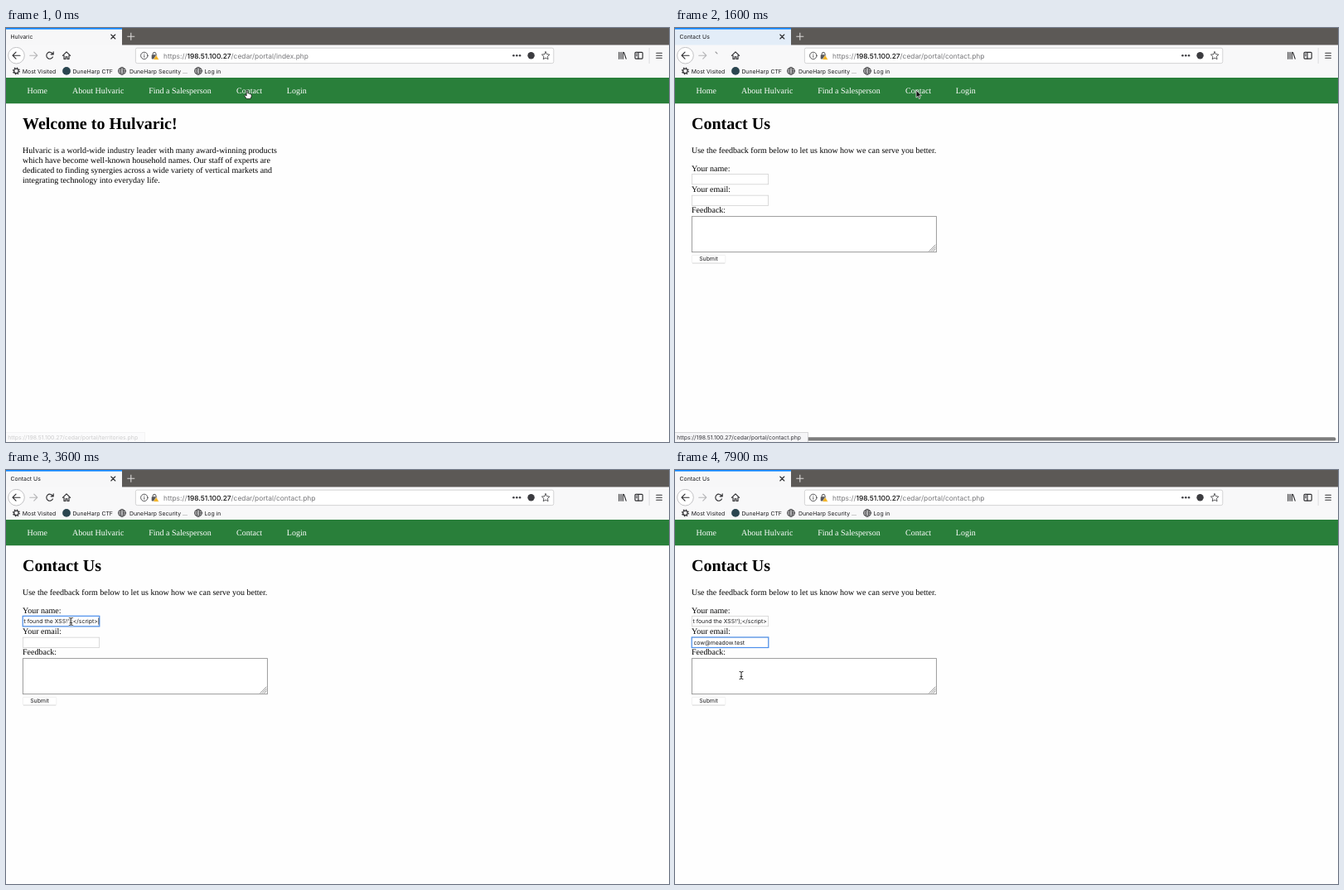
These frames come from a looping animation (800x500 px, 8 s). An HTML page:

```html
<!DOCTYPE html>
<html lang="en">
<head>
<meta charset="utf-8">
<title>Contact form</title>
<style>
html, body { margin: 0; width: 100%; height: 100%; overflow: hidden; background: #fefefe; }
svg { display: block; width: 100%; height: 100%; text-rendering: geometricPrecision; }
.ui { font-family: Inter, Roboto, sans-serif; font-size: 6.9px; fill: #1a1a1c; }
.url { font-size: 8.4px; fill: #77777a; }
.url .host { fill: #0c0c0d; font-weight: 500; }
.page { font-family: "Liberation Serif", "Noto Serif", serif; font-size: 10px; fill: #000; }
.page .h { font-size: 20px; font-weight: bold; }
.nav { fill: #fff; }
.line { fill: none; stroke: #2f2f32; stroke-width: 1.15; stroke-linecap: round; stroke-linejoin: round; }
.thin { stroke-width: .8; }
.field { fill: #fff; stroke: #d2d2d2; stroke-width: .8; }
.ring { fill: none; stroke: #4d90ec; stroke-width: 1.2; }
.status rect { fill: #f5f5f7; stroke: #c6c6c8; stroke-width: .7; }
.status text { fill: #38383d; }

/* one loop is 8 s, so 1.25% is 100 ms */
.before, .after, .titles, .name-ring, .name-text, .mail-ring, .typed, .filled,
.list, .caret, .load, .read, .hand, .arrow, .beam { animation: 8s step-end infinite; }
.moving, .moved, .bar, .over, .stop1, .stop2, .reload, .tint { animation: 8s linear infinite; }

.before { animation-name: before; }
.after { animation-name: after; }
.titles { animation-name: titles; }
.load { animation-name: load; }
.read { animation-name: read; }
.over { animation-name: over; }
.faint { animation: faint 8s step-end infinite; }
.stop1 { animation-name: stop1; stroke-dasharray: 1 2; }
.stop2 { animation-name: stop2; }
.reload { animation-name: reload; }
.tint { animation-name: tint; }
.bar { animation-name: bar; }
.name-ring { animation-name: nameRing; }
.name-text { animation-name: nameText; }
.mail-ring { animation-name: mailRing; }
.typed { animation-name: typed; }
.list { animation-name: list; }
.filled { animation-name: filled; }
.caret { animation-name: caret; }
.hand { animation-name: hand; }
.arrow { animation-name: arrow; }
.beam { animation-name: beam; }
.moving { animation-name: move; animation-timing-function: ease-in-out; }
.dot { animation: swing .4s ease-in-out infinite alternate; }

@keyframes before { 0% { opacity: 1 } 15%, 100% { opacity: 0 } }
@keyframes after { 0% { opacity: 0 } 15%, 100% { opacity: 1 } }
@keyframes titles { 0% { transform: none } 11.25% { transform: translateX(13.6px) } 18.75%, 100% { transform: none } }
@keyframes load { 0% { opacity: 0 } 11.25% { opacity: 1 } 18.75%, 100% { opacity: 0 } }
@keyframes swing { from { transform: translateX(-7px) } to { transform: none } }
@keyframes faint { 0% { opacity: .25 } 1.25%, 100% { opacity: 0 } }
@keyframes over {
  0%, 1.2% { opacity: 0 } 1.25% { opacity: .4 } 3.75%, 14.99% { opacity: 1 }
  15%, 18.74% { opacity: 0 } 18.75%, 25% { opacity: 1 } 27%, 100% { opacity: 0 }
}
@keyframes read { 0% { opacity: 0 } 15% { opacity: 1 } 18.75%, 100% { opacity: 0 } }
@keyframes stop1 {
  0%, 11.24% { opacity: 0; stroke-dashoffset: 0 } 11.25%, 18.2% { opacity: 1; stroke-dashoffset: 0 }
  20.6% { opacity: .3; stroke-dashoffset: 1 } 20.7%, 100% { opacity: 0; stroke-dashoffset: 1 }
}
@keyframes stop2 { 0%, 11.24% { opacity: 0 } 11.25%, 18.2% { opacity: 1 } 19.6%, 100% { opacity: 0 } }
@keyframes reload { 0%, 11.24% { opacity: 1 } 11.25%, 21.8% { opacity: 0 } 23.75%, 100% { opacity: 1 } }
@keyframes tint { 0%, 18.74% { opacity: 0 } 19.3% { opacity: .14 } 20% { opacity: .08 } 21.5%, 100% { opacity: 0 } }
@keyframes bar { 0%, 14.99% { opacity: 0 } 15%, 33.75% { opacity: 1 } 38.75%, 100% { opacity: 0 } }
@keyframes nameRing { 0% { opacity: 0 } 32.5% { opacity: 1 } 55%, 100% { opacity: 0 } }
@keyframes nameText { 0% { opacity: 0 } 43.75%, 100% { opacity: 1 } }
@keyframes mailRing { 0% { opacity: 0 } 55%, 100% { opacity: 1 } }
@keyframes typed { 0% { opacity: 0 } 76.25% { opacity: 1 } 91.25%, 100% { opacity: 0 } }
@keyframes list { 0% { opacity: 0 } 77.5% { opacity: 1 } 91.25%, 100% { opacity: 0 } }
@keyframes filled { 0% { opacity: 0 } 91.25%, 100% { opacity: 1 } }
@keyframes caret {
  0% { opacity: 0; transform: translate(22.8px, 178.5px) }
  32.5% { opacity: 1 } 38.75% { opacity: 0 }
  43.75% { opacity: 1; transform: translate(111.3px, 178.5px) } 50% { opacity: 0 }
  55% { opacity: 1; transform: translate(22.8px, 204px) } 61.25% { opacity: 0 }
  67.5% { opacity: 1 } 73.75% { opacity: 0 }
  76.25% { opacity: 1; transform: translate(26.8px, 204px) } 82.5% { opacity: 0 }
  88.75% { opacity: 1 }
  91.25% { opacity: 1; transform: translate(85px, 204px) }
  97.5%, 100% { opacity: 0; transform: translate(85px, 204px) }
}
@keyframes hand { 0% { opacity: 1 } 15%, 100% { opacity: 0 } }
@keyframes arrow { 0% { opacity: 0 } 15% { opacity: 1 } 30.6%, 100% { opacity: 0 } }
@keyframes beam { 0% { opacity: 0 } 30.6% { opacity: 1 } 76.25% { opacity: 0 } 93.75%, 100% { opacity: 1 } }
@keyframes move {
  0%, 23.75% { transform: translate(291px, 75px) }
  32%, 48.75% { transform: translate(78.4px, 183px) }
  53.75%, 93.75% { transform: translate(71px, 207px) }
  97.5%, 100% { transform: translate(80px, 248px) }
}
</style>
</head>
<body>
<svg viewBox="0 0 800 500" preserveAspectRatio="none">
  <defs>
    <clipPath id="inName"><rect x="21.8" y="177" width="90.4" height="11"/></clipPath>
    <filter id="shade" x="-20%" y="-40%" width="140%" height="220%">
      <feDropShadow dx="0" dy="2" stdDeviation="1.8" flood-color="#000" flood-opacity=".4"/>
    </filter>
    <g id="globe" class="line thin">
      <circle r="4.4"/><ellipse rx="2" ry="4.4"/><path d="M-4.4 0H4.4M-3.8-2.2H3.8M-3.8 2.2H3.8"/>
    </g>
  </defs>
  <rect width="800" height="500" fill="#fefefe"/>

  <!-- browser frame -->
  <rect width="800" height="21" fill="#5c5956"/>
  <rect y="20.5" width="800" height="39.5" fill="#f8f8f9"/>
  <rect width="140" height="21" fill="#f7f7f8"/>
  <rect class="tint" y="1.5" width="140" height="19" fill="#0a84ff"/>
  <rect width="140" height="1.6" fill="#0a84ff"/>
  <path class="line" d="M126.8 8l5 5m0-5l-5 5"/>
  <path d="M146.3 10.3h9m-4.5-4.5v9" stroke="#d9d8d6" stroke-width="1.1"/>
  <g class="ui titles">
    <text class="before" x="5.5" y="13.4">Hulvaric</text>
    <text class="after" x="5.5" y="13.4">Contact Us</text>
  </g>
  <g class="load"><circle class="dot" cx="13.7" cy="10.8" r="1.2" fill="#1a73e8"/></g>

  <circle cx="12.5" cy="33.2" r="9.8" fill="#fff" stroke="#b4b4b6" stroke-width=".8"/>
  <path class="line" d="M17 33.2H8.2m3.8-4l-4 4 4 4"/>
  <path class="line" style="stroke:#b5b5b7" d="M28.8 33.2h8.8m-3.8-4l4 4-4 4"/>
  <path class="line reload" d="M56.4 35a4 4 0 1 1-.3-4.1M57.2 28.8v3h-3"/>
  <path class="line stop1" pathLength="1" d="M49 29l8 8"/>
  <path class="line stop2" d="M57 29l-8 8"/>
  <path class="line" d="M68.4 33.4l4.6-4.6 4.6 4.6M70 33v4.5h2v-2.8h2v2.8h2V33"/>

  <rect x="156.4" y="24.2" width="504.4" height="18.4" rx="2" fill="#fff" stroke="#c9c9cb" stroke-width=".8"/>
  <g class="line thin">
    <circle cx="166.8" cy="33.4" r="4.2"/>
    <path d="M166.8 33v2.4m0-4.2v.1"/>
    <path d="M177.2 32.4v-1.2a1.9 1.9 0 0 1 3.8 0v1.2"/>
  </g>
  <rect x="175.7" y="32.2" width="6.4" height="5.2" rx=".7" fill="#58585c"/>
  <path d="M181.2 32.8l3.4 5.4h-6.8z" fill="#f2b01e" stroke="#fff" stroke-width=".4"/>
  <g class="ui url">
    <text class="before" x="190" y="36.6">https://<tspan class="host">198.51.100.27</tspan>/cedar/portal/index.php</text>
    <text class="after" x="190" y="36.6">https://<tspan class="host">198.51.100.27</tspan>/cedar/portal/contact.php</text>
  </g>
  <g fill="#3c3c40">
    <circle cx="612.5" cy="33.3" r="1.25"/><circle cx="616.3" cy="33.3" r="1.25"/><circle cx="620.1" cy="33.3" r="1.25"/>
    <circle cx="633.6" cy="33.2" r="4.2"/>
  </g>
  <path class="line thin" d="M651.2 28.7l1.4 3 3.3.4-2.4 2.3.6 3.3-2.9-1.6-2.9 1.6.6-3.3-2.4-2.3 3.3-.4z"/>
  <path class="line" d="M739.8 29.3v8m2.3-8v8m2.3-8v8m1.2-7.8l2.6 7.6"/>
  <rect class="line" x="759" y="29.3" width="9.2" height="7.8" rx="1"/>
  <path class="line" d="M763 29.5v7.5m-2.6-5.5h1m-1 2h1"/>
  <path d="M776.2 24v19" stroke="#d3d3d5" stroke-width=".7"/>
  <path class="line" d="M784.8 30.2h6.6m-6.6 3h6.6m-6.6 3h6.6"/>

  <!-- bookmarks -->
  <circle class="line" cx="12.4" cy="51.9" r="2.7"/>
  <circle cx="12.4" cy="51.9" r="3.8" fill="none" stroke="#2f2f32" stroke-width="1.4" stroke-dasharray="1.49 1.49"/>
  <circle cx="73" cy="51.9" r="4.9" fill="#2b4650"/>
  <use href="#globe" x="140" y="51.9"/>
  <use href="#globe" x="232" y="51.9"/>
  <g class="ui">
    <text x="19.8" y="54.5">Most Visited</text>
    <text x="80.4" y="54.5">DuneHarp CTF</text>
    <text x="149" y="54.5">DuneHarp Security ...</text>
    <text x="239.4" y="54.5">Log in</text>
  </g>

  <!-- page -->
  <rect y="60" width="800" height="31.2" fill="#297f3a"/>
  <g class="page nav">
    <text x="25.5" y="79.4">Home</text>
    <text x="80" y="79.4">About Hulvaric</text>
    <text x="172.2" y="79.4">Find a Salesperson</text>
    <text x="278" y="79.4">Contact</text>
    <text x="338.8" y="79.4">Login</text>
  </g>
  <g class="page before">
    <text class="h" x="20" y="121.8">Welcome to Hulvaric!</text>
    <text x="20" y="150.6">Hulvaric is a world-wide industry leader with many award-winning products</text>
    <text x="20" y="162.6">which have become well-known household names. Our staff of experts are</text>
    <text x="20" y="174.6">dedicated to finding synergies across a wide variety of vertical markets and</text>
    <text x="20" y="186.6">integrating technology into everyday life.</text>
  </g>
  <g class="after">
    <g class="page">
      <text class="h" x="20" y="121.8">Contact Us</text>
      <text x="20" y="150.6">Use the feedback form below to let us know how we can serve you better.</text>
      <text x="20" y="172.8">Your name:</text>
      <text x="20" y="198.3">Your email:</text>
      <text x="20" y="223.3">Feedback:</text>
    </g>
    <rect class="field" x="20.4" y="176.6" width="92.2" height="12.2"/>
    <rect class="field" x="20.4" y="202.2" width="92.2" height="12.2"/>
    <rect x="20.4" y="227.6" width="295" height="43" fill="#fff" stroke="#929292" stroke-width=".9"/>
    <path class="line" style="stroke:#666;stroke-width:.7" d="M306.8 269.4l7.4-7.4m-5 7.4l5-5m-2.6 5l2.6-2.6"/>
    <rect x="20.4" y="274.4" width="40.4" height="9.6" rx="1" fill="#fff" stroke="#e6e6e6" stroke-width=".6"/>
    <path d="M21 284.1h39.2" stroke="#c8c8c8" stroke-width=".6"/>
    <g class="ui">
      <text x="40.5" y="281.4" text-anchor="middle">Submit</text>
      <g clip-path="url(#inName)">
        <text class="name-text" x="110.8" y="185.3" text-anchor="end">t found the XSS!');&lt;/script&gt;</text>
      </g>
      <text class="typed" x="22.4" y="210.9">c</text>
      <text class="filled" x="22.4" y="210.9">cow@meadow.test</text>
    </g>
    <rect class="ring name-ring" x="20.2" y="176.4" width="92.6" height="12.5"/>
    <rect class="ring mail-ring" x="20.2" y="202" width="92.6" height="12.5"/>
    <g class="list ui">
      <rect x="20" y="215" width="92.6" height="12" fill="#fff" filter="url(#shade)"/>
      <text x="23" y="223.4" font-size="7.25">cow@meadow.test</text>
    </g>
  </g>
  <rect class="caret" width=".7" height="8.4" fill="#111"/>

  <!-- scrollbar and status -->
  <rect class="bar" x="1" y="494.2" width="796.4" height="4.4" rx="2.2" fill="#7c7c7c"/>
  <g class="status ui">
    <g class="faint">
      <rect x="-1" y="488.6" width="168.4" height="13"/>
      <text x="2.2" y="497.2">https://198.51.100.27/cedar/portal/territories.php</text>
    </g>
    <g class="over">
      <rect x="-1" y="488.6" width="161.4" height="13"/>
      <text x="2.2" y="497.2">https://198.51.100.27/cedar/portal/contact.php</text>
    </g>
    <g class="read">
      <rect x="-1" y="488.6" width="152.2" height="13"/>
      <text x="2.2" y="497.2">Read 198.51.100.27</text>
    </g>
  </g>

  <!-- pointer -->
  <g class="moving">
    <path class="hand" fill="#fff" stroke="#111" stroke-width=".8" stroke-linejoin="round"
      d="M-.9.6Q0-.5.9.6V4Q2 3.3 2.6 4.4 3.6 3.8 4.1 5 5.2 4.8 5.2 6V7.6L4 10.6H-.6L-3.4 6.8Q-3.4 5.4-1.9 6.1L-.9 7Z"/>
    <path class="arrow" fill="#111" stroke="#fff" stroke-width=".7"
      d="M0 0V9.2L2.1 7.3 3.5 10.5 5 9.9 3.6 6.8H6.4Z"/>
    <g class="beam" fill="none" stroke-linecap="round">
      <path id="ibeam" stroke="#fff" stroke-width="1.8" d="M-2-4.6Q0-4.6 0-3.4 0-4.6 2-4.6M0-3.4V3.4M-2 4.6Q0 4.6 0 3.4 0 4.6 2 4.6M-1.1 1.4H1.1"/>
      <path stroke="#111" stroke-width=".9" d="M-2-4.6Q0-4.6 0-3.4 0-4.6 2-4.6M0-3.4V3.4M-2 4.6Q0 4.6 0 3.4 0 4.6 2 4.6M-1.1 1.4H1.1"/>
    </g>
  </g>
</svg>
</body>
</html>
```
